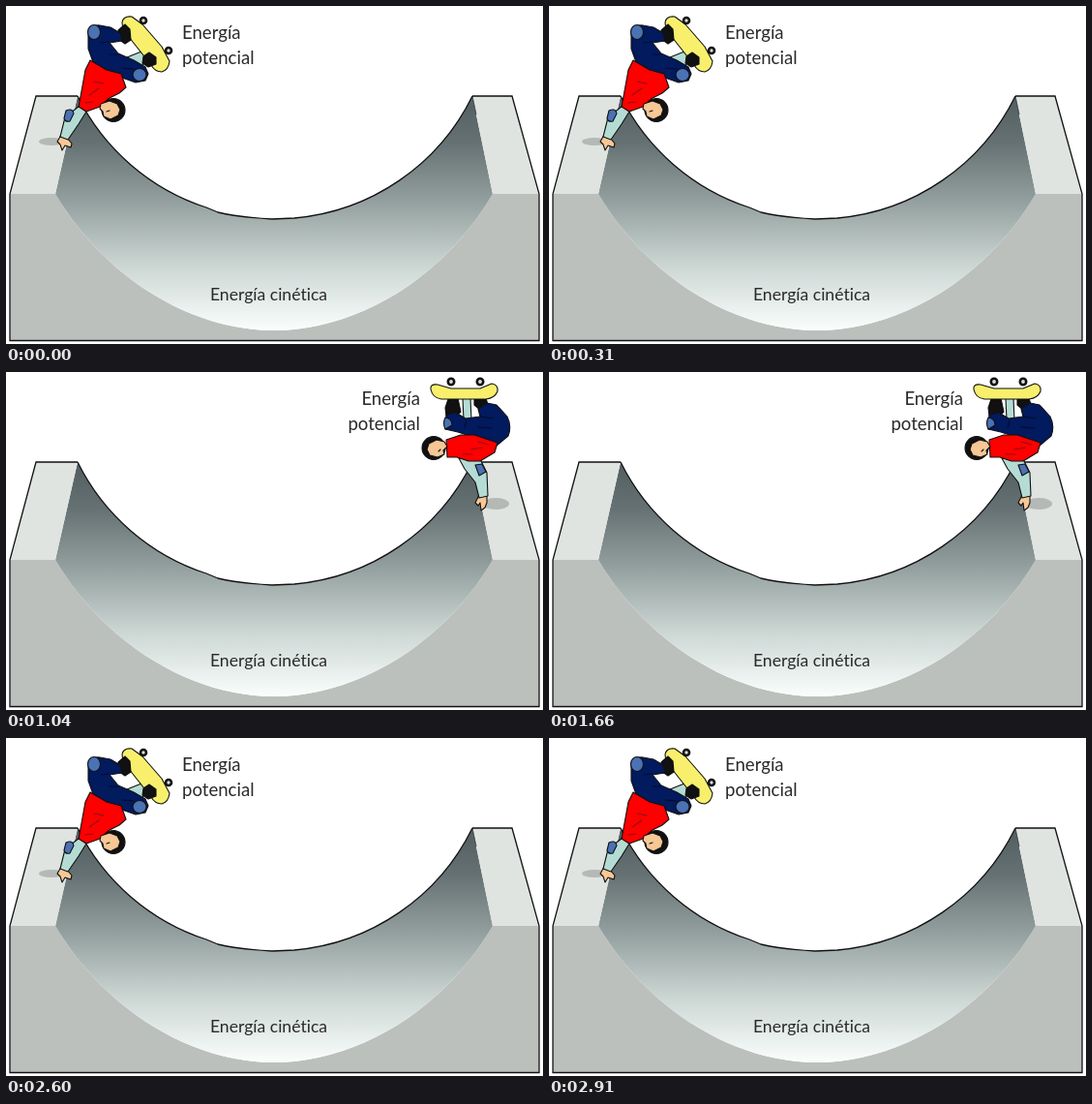
These frames come from a looping animation (555x349 px, 3.12 s). An HTML page:

```html
<!DOCTYPE html>
<html lang="es">
<head>
<meta charset="utf-8">
<title>Energía potencial y cinética</title>
<style>
html, body { margin: 0; width: 100%; height: 100%; overflow: hidden; background: #fff }
svg { display: block; width: 100%; height: 100% }
text { font: 18.6px Lato, sans-serif; font-variant-ligatures: none; fill: #2a2a2a }
.pose { visibility: hidden; stroke: #111; stroke-width: 1.1; stroke-linejoin: round; stroke-linecap: round }
.pose text { stroke: none }
.red { fill: #fe0000 } .navy { fill: #021a5e } .blue { fill: #4a72b4 }
.teal { fill: #b4dcd4 } .skin { fill: #f8c796 } .board { fill: #f8f06c }
.black { fill: #111 } .shade { fill: #b4b9b6; stroke: none }
.wheel { fill: #ddd; stroke-width: 2.6 }
.fold { fill: none; stroke: #8d1018 }
.crease { fill: none; stroke: #050b2c }
.wind { fill: none; stroke: #b2dcec; stroke-width: 1.6 }
.dust { fill: none; stroke: #f5fafa; stroke-width: 1.7 }
</style>
</head>
<body>
<svg viewBox="0 0 555 349">
  <defs>
    <linearGradient id="depth" gradientUnits="userSpaceOnUse" x1="0" y1="93" x2="0" y2="335">
      <stop offset="0" stop-color="#525d60"/>
      <stop offset=".2" stop-color="#667173"/>
      <stop offset=".45" stop-color="#94a09f"/>
      <stop offset=".72" stop-color="#cbd6d3"/>
      <stop offset="1" stop-color="#fafefd"/>
    </linearGradient>
  </defs>

  <g id="ramp">
    <path fill="#bbc0bd" d="M4 194H51C105 285 195 335 277 335S450 285 503 194H551V345H4z"/>
    <path fill="url(#depth)" d="M74 93A227 227 0 0 0 207 208L219 213Q240 218 275 220L298 219A227 227 0 0 0 482 93L503 194C450 285 359 335 277 335S105 285 51 194z"/>
    <path fill="#dfe4e1" d="M31 93H74L51 194H4zM482 93H523L551 194H503z"/>
    <g fill="none" stroke="#111" stroke-width="1.3">
      <path d="M74 93H31L4 194V345.5H551V194L523 93H482"/>
      <path d="M74 93A227 227 0 0 0 207 208L219 213Q240 218 275 220L298 219A227 227 0 0 0 482 93"/>
      <path stroke-width=".7" d="M482 93L486 112"/>
    </g>
  </g>

  <g class="pose" id="left">
    <ellipse class="shade" cx="47" cy="140" rx="13" ry="4"/>
    <path class="skin" d="M57 133L53 140 56 143 58 149 61 144 67 146 68 142 63 136z"/>
    <path class="teal" d="M76 103L83 109 75 122 64 138 56 135 61 115z"/>
    <path class="blue" d="M62 108Q69 105 70 111L66 119Q61 120 60 116z"/>
    <path class="teal" d="M120 55L140 47 148 52 139 64z"/>
    <path class="board" d="M120 17Q121 10 130 11L141 19 161 42 169 57Q168 66 161 68 154 68 150 61L127 32Q120 24 120 17z"/>
    <circle class="wheel" cx="142" cy="15" r="3"/>
    <circle class="wheel" cx="168" cy="46" r="3"/>
    <path class="black" d="M116 25L123 19 128 24 129 35 123 39 116 34zM142 52L148 48 155 53 155 60 147 63 141 59z"/>
    <path class="navy" d="M85 29Q88 19 97 20L108 22 118 28 120 36 107 38 116 49 132 56 144 63 147 70 144 77 134 79 117 73 103 67 90 58 85 44z"/>
    <path class="crease" d="M106 37L98 38M116 50L107 50M120 64L132 65"/>
    <ellipse class="blue" cx="91" cy="27" rx="6.5" ry="7.5"/>
    <ellipse class="blue" cx="138" cy="71" rx="7" ry="6.5"/>
    <path class="red" d="M87 56L104 66 119 70 124 84 117 90 107 95 97 104 83 109 75 104 78 88 82 66z"/>
    <path class="fold" d="M86 92L96 85M91 78L101 80M82 100L90 99"/>
    <circle class="black" cx="111" cy="107.5" r="12"/>
    <path class="skin" d="M98 101L107 98 115 101 118 107 116 113 108 117 101 114 100 109 97 106z"/>
    <path d="M104 109L107 108" fill="none"/>
    <text x="182" y="34">Energía</text>
    <text x="182" y="60">potencial</text>
  </g>

  <g class="pose" id="right">
    <ellipse class="shade" cx="506" cy="136" rx="14" ry="6"/>
    <path class="skin" d="M489 127L485 135 488 138 490 135 491 143 495 140 497 135 497 127z"/>
    <path class="teal" d="M468 89L490 90 497 104 498 128 489 130 485 114 474 100z"/>
    <path class="blue" d="M485 96L492 95 496 103 489 107z"/>
    <path class="teal" d="M472 27L480 27 481 50 473 50z"/>
    <path class="black" d="M457 28L467 27 470 41 465 46 455 45 454 37zM484 27L496 27 498 34 490 39 484 34z"/>
    <path class="board" d="M439 18Q438 12 446 13L460 17H490L502 12Q509 13 508 20 505 27 496 28H450Q441 27 439 18z"/>
    <circle class="wheel" cx="460" cy="10" r="3.2"/>
    <circle class="wheel" cx="490" cy="10" r="3.2"/>
    <path class="navy" d="M455 44L465 42 475 48 490 46 488 38 497 32 507 34 518 46Q523 56 519 66L507 76 486 68 467 62 454 59z"/>
    <path class="crease" d="M490 46L503 48M476 50L474 57M488 57L502 58"/>
    <path class="blue" d="M454 47Q461 48 461 55L454 59Q451 53 454 47z"/>
    <path class="red" d="M455 70L470 65 484 65 508 73 505 83 490 92 478 92 466 88 456 88z"/>
    <path class="fold" d="M481 80L492 78M472 85L482 85M488 72L499 75"/>
    <circle class="black" cx="442" cy="78.5" r="12"/>
    <path class="skin" d="M453 72L445 70 437 74 435 80 438 86 446 88 453 85 452 81 456 77z"/>
    <path d="M447 82L449 80" fill="none"/>
    <text x="428" y="34" text-anchor="end">Energía</text>
    <text x="428" y="60" text-anchor="end">potencial</text>
  </g>

  <g class="pose" id="crouch">
    <path class="wind" d="M190 176L222 194M203 180L231 195M245 170L277 185M261 172L291 186"/>
    <path class="dust" d="M188 232L217 246M198 233L218 242M193 243L223 256"/>
    <ellipse class="shade" cx="268" cy="275" rx="45" ry="6" opacity=".75"/>
    <path class="skin" d="M224 205L216 206 209 204 212 209 210 213 217 215 225 211z"/>
    <path class="teal" d="M264 193L244 194 222 204 224 212 240 208 259 208z"/>
    <path class="blue" d="M239 197L249 193 260 195 255 202 243 204z"/>
    <path class="black" d="M237 256L246 253 261 260 260 264 236 264zM266 255L276 253 289 259 288 265 265 265z"/>
    <path class="board" d="M233 264Q234 260 240 262L249 265H290L300 261Q307 261 306 266 303 272 292 273H247Q236 271 233 264z"/>
    <circle class="wheel" cx="249" cy="275" r="3"/>
    <circle class="wheel" cx="286" cy="275" r="3"/>
    <path class="navy" d="M226 226L241 219 264 223 282 221 291 229 289 239 277 246 277 257 264 257 259 248 248 257 237 259 239 245 229 241 224 234z"/>
    <path class="crease" d="M240 244L253 239 268 238M259 248L263 239M247 232L266 229"/>
    <path class="skin" d="M286 201L304 204 307 210 304 212 303 218 295 220 286 214z"/>
    <path class="black" d="M291 216L303 214 301 220 294 220z"/>
    <path class="red" d="M231 215L245 201 262 192 283 194 290 208 285 221 270 222 254 220 239 226 226 229 225 224z"/>
    <path class="fold" d="M258 214L270 206 280 206M262 218L276 213M243 215L252 211"/>
    <path class="teal" d="M274 222L285 221 291 230 301 231 301 239 287 240 278 234z"/>
    <path class="blue" d="M278 224L286 227 290 239 280 236z"/>
    <path class="skin" d="M299 231L306 228 310 232 309 239 302 240 299 237z"/>
    <path class="black" d="M283 202Q285 191 297 191 311 193 313 204L312 208 295 205 292 212 286 209z"/>
  </g>

  <text x="271.5" y="304" text-anchor="middle" style="font-size: 17.6px">Energía cinética</text>
</svg>
<script>
const LOOP = 3120;
const poses = ["left", "right", "crouch"].map(id => document.getElementById(id));
const crouch = poses[2];
const schedule = [[520, "left"], [1040, "crouch"], [2080, "right"], [2600, "crouch"], [LOOP, "left"]];
const start = performance.now();

function draw(now) {
  const t = Math.max(0, now - start) % LOOP;
  const current = schedule.find(([end]) => t < end)[1];
  for (const p of poses) p.style.visibility = p.id === current ? "visible" : "hidden";
  // The return ride is the same crouch, mirrored
  crouch.setAttribute("transform", t < 2080 ? "" : "translate(529 0) scale(-1 1)");
  requestAnimationFrame(draw);
}
draw(start);
</script>
</body>
</html>
```
